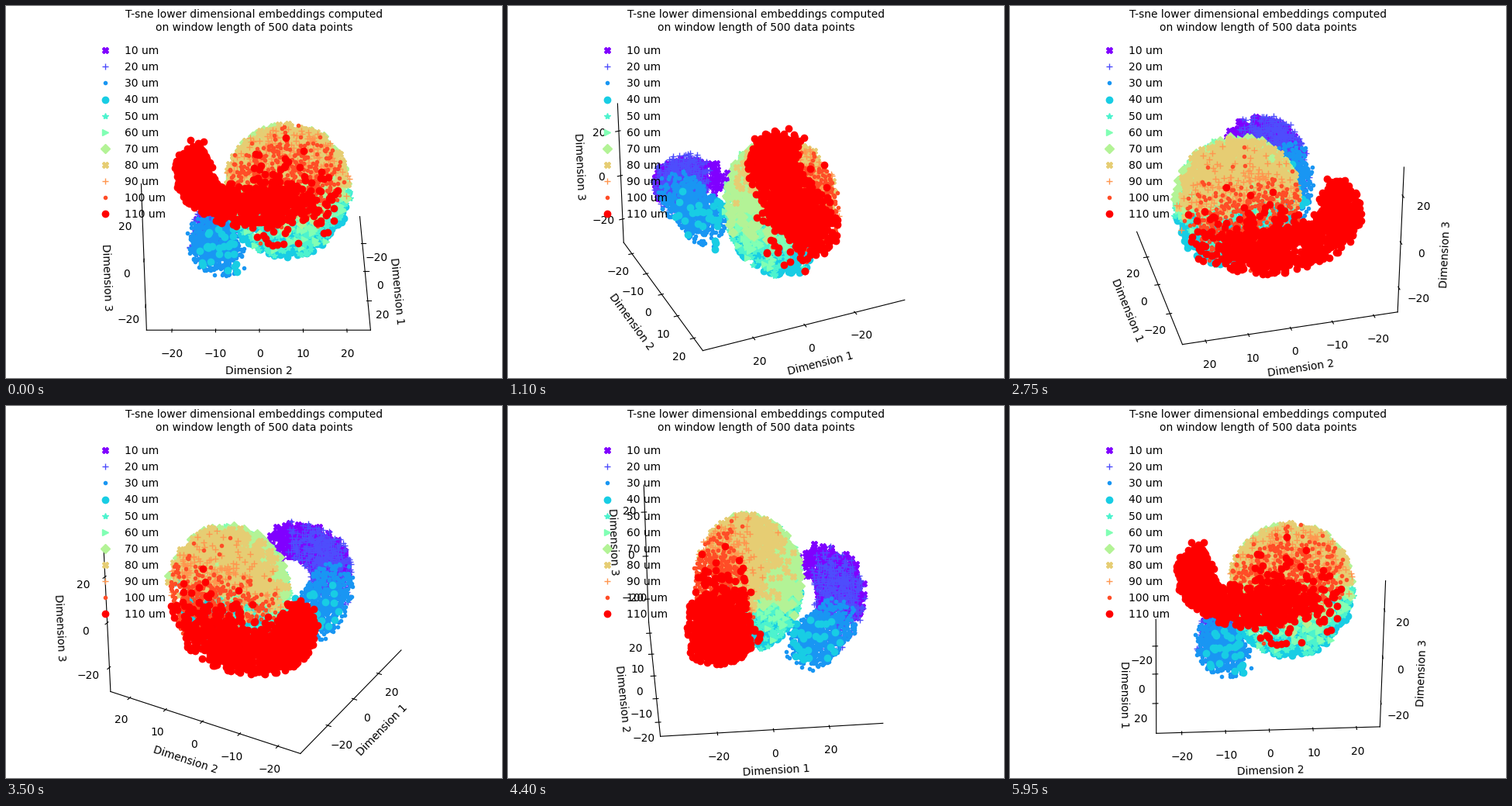
A matplotlib script that plays this animation: 640 by 480 pixels, repeating every 6 s.

```python
from itertools import cycle

import numpy as np
import matplotlib.pyplot as plt
from matplotlib.animation import FuncAnimation

FRAMES, STEP_MS = 120, 50
LIMITS = np.array([(-40.2, 39.3), (-25.8, 25.4), (-31.0, 32.0)])
MID = LIMITS.mean(axis=1)
UNIT = np.ptp(LIMITS, axis=1) / (281, 281, 210.8)  # data units per box unit
COUNTS = [420, 560, 620, 480, 400, 420, 650, 600, 200, 380, 140]

rng = np.random.default_rng(7)


def ball(n):
    d = rng.normal(size=(n, 3))
    d /= np.linalg.norm(d, axis=1, keepdims=True)
    return d * rng.uniform(size=(n, 1)) ** 0.28


def tail(n, start, end, size):
    """Bent tube beside the body that holds the small sizes."""
    t = np.radians(rng.uniform(start, end, n))
    path = np.column_stack([55 + 42 * np.sin(t - np.pi / 4),
                            -4 + 56 * np.cos(t), -4 + 56 * np.sin(t)])
    return path + ball(n) * (32, size, size)


def body(n, angle):
    """Wedge of a large ellipsoid around the given angle."""
    t = np.radians(rng.normal(angle, 32, n))
    side = rng.uniform(-1, 1, n)
    ring = np.sqrt(1 - side ** 2)
    d = np.column_stack([ring * np.cos(t), side, ring * np.sin(t)])
    r = rng.uniform(size=(n, 1)) ** 0.3
    return (-13, 37, 8) + d * r * (72, 82, 92)


def horn(n):
    """Curved band below the body, for the largest size."""
    t = np.radians(rng.uniform(150, 305, n))
    path = np.column_stack([np.full(n, -58), 90 * np.cos(t),
                            8 + 50 * np.sin(t)])
    return path + ball(n) * (40, 23, 24)


def cloud(i):
    n = COUNTS[i]
    if i < 3:
        return tail(n, 75 + 25 * i ** 2, 165 + 30 * i, 24 + 5 * i)
    points = body(n, 40 * i - 182)
    if i == 3:
        points = np.vstack([points, tail(30, 200, 230, 34)])
    if i == 10:
        points = np.vstack([points, horn(850)])
    return points


fig = plt.figure(figsize=(6.4, 4.8), dpi=100)
ax = fig.add_axes([102 / 640, 4 / 480, 436 / 640, 436 / 480], projection="3d")

colors = plt.cm.rainbow(np.linspace(0, 1, len(COUNTS)))
for i, (color, marker) in enumerate(zip(colors, cycle("X+.o*>D"))):
    x, y, z = (MID + cloud(i) * UNIT).T
    ax.plot(x, y, z, marker, color=color, label=f"{10 * (i + 1)} um")

ax.set(xlim=LIMITS[0], ylim=LIMITS[1], zlim=LIMITS[2],
       xticks=[-20, 0, 20], yticks=range(-20, 21, 10), zticks=[-20, 0, 20],
       xlabel="Dimension 1", ylabel="Dimension 2", zlabel="Dimension 3")
ax.grid(False)
for axis in (ax.xaxis, ax.yaxis, ax.zaxis):
    axis.set_pane_color((1, 1, 1, 0))

# 3D axes scale the title height by 0.92
ax.set_title("T-sne lower dimensional embeddings computed\n"
             "on window length of 500 data points", fontsize=10, y=1 / 0.92)
ax.legend(loc="upper left", bbox_to_anchor=(0, 1.003), frameon=False,
          labelspacing=0.51)


def turn(i):
    # tiny offset keeps the axis edges well defined when seen head-on
    ax.view_init(elev=30, azim=360 * i / FRAMES + 1e-3)
    return []


anim = FuncAnimation(fig, turn, frames=FRAMES, interval=STEP_MS, repeat=True)
plt.show()
```
